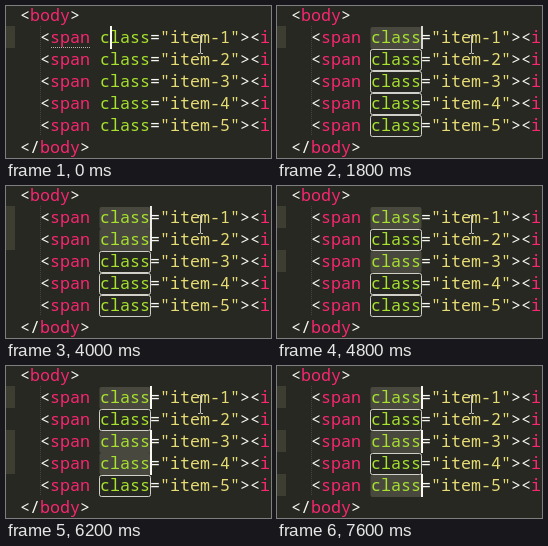
An HTML page for the animation above (7800 ms loop, 265 by 152 pixels).

```html
<!DOCTYPE html>
<html lang="en">
<head>
<meta charset="utf-8">
<title>Multiple selection</title>
<style>
  html, body { margin: 0; width: 100%; height: 100%; overflow: hidden; background: #272822; }
  svg { display: block; width: 100%; height: 100%; }
  text { font: 500 16.667px "Noto Sans Mono", "DejaVu Sans Mono", monospace; white-space: pre; fill: #f8f8f2; }
  .tag { fill: #f92672; }
  .attr { fill: #a6e22e; }
  .str { fill: #e6db74; }
  .gutter { fill: #3e3d32; }
  .sel { fill: #49483e; }
  .box { fill: none; stroke: #d0d0c8; }
  .caret { fill: #f8f8f0; }
  .under { stroke: #b8b8b0; stroke-dasharray: 1 1; }
  .guide { stroke: #43443c; stroke-dasharray: 1 1; }
  .mouse { fill: none; stroke: #c4c4bc; }
</style>
</head>
<body>
<svg id="stage" viewBox="0 0 265 152"></svg>
<script>
const NS = "http://www.w3.org/2000/svg";
const stage = document.getElementById("stage");
const LOOP = 7800, STEP = 200, BLINK = 1200;
const CHAR = 10, LINE = 22, LEFT = 14;
const INDENT = LEFT + 2 * CHAR, WORD = INDENT + 6 * CHAR;

// Each edit: start time, selected rows, blink phase at that moment
const edits = [
  { at: 0, rows: [1], phase: 250, col: 1 },
  { at: 800, rows: [1], phase: 150, col: 5 },
  { at: 2600, rows: [1, 2], phase: 120, col: 5 },
  { at: 4200, rows: [1, 3], phase: 150, col: 5 },
  { at: 5000, rows: [1, 3, 4], phase: 50, col: 5 },
  { at: 6400, rows: [1, 3, 5], phase: 50, col: 5 }
];

function add(name, attrs) {
  const node = document.createElementNS(NS, name);
  for (const key in attrs) node.setAttribute(key, attrs[key]);
  return stage.appendChild(node);
}

function rect(cls, x, y, width, height, rx = 0) {
  return add("rect", { class: cls, x, y, width, height, rx });
}

function write(row, x, parts) {
  const line = add("text", { x, y: 14.5 + row * LINE });
  for (const [str, cls] of parts) {
    const span = document.createElementNS(NS, "tspan");
    span.textContent = str;
    if (cls) span.setAttribute("class", cls);
    line.appendChild(span);
  }
}

function show(node, on) {
  node.setAttribute("visibility", on ? "visible" : "hidden");
}

add("path", { class: "guide", d: `M${INDENT + 0.5} 20V130` });

const rows = [1, 2, 3, 4, 5].map(n => {
  const y = n * LINE - 1;
  return {
    n,
    gutter: rect("gutter", 0, y - 1, 9, LINE),
    sel: rect("sel", WORD - 0.5, y, 5 * CHAR + 1, LINE, 2),
    box: rect("box", WORD - 0.5, y + 0.5, 5 * CHAR + 1, LINE - 1, 2)
  };
});

write(0, LEFT, [["<"], ["body", "tag"], [">"]]);
for (const { n } of rows) {
  write(n, INDENT, [
    ["<"], ["span", "tag"], [" "], ["class", "attr"], ["="],
    [`"item-${n}"`, "str"], ["><"], ["i", "tag"]
  ]);
}
write(6, LEFT, [["</"], ["body", "tag"], [">"]]);

const under = add("path", { class: "under", d: "M45 41.5H84" });
for (const row of rows) row.caret = rect("caret", 0, row.n * LINE - 2, 2, LINE + 1);
add("path", { class: "mouse", d: "M192 29.5H194L194.5 30L195 29.5H197M194.5 30V47M192 47.5H194L194.5 47L195 47.5H197" });

// Hold, fade out, stay off, fade in: a quarter of the period each
function glow(ms) {
  const q = (ms % BLINK) / (BLINK / 4);
  if (q < 1) return 1;
  if (q < 2) return 2 - q;
  return q < 3 ? 0 : q - 3;
}

function draw(time) {
  const t = Math.floor((time % LOOP) / STEP) * STEP;
  const edit = edits.filter(e => e.at <= t).pop();
  const marked = edit.col === 5;
  const alpha = glow(t - edit.at + edit.phase);
  for (const row of rows) {
    const active = edit.rows.includes(row.n);
    show(row.gutter, active);
    show(row.sel, active && marked);
    show(row.box, !active && marked);
    show(row.caret, active);
    row.caret.setAttribute("x", WORD + edit.col * CHAR);
    row.caret.setAttribute("opacity", alpha);
  }
  show(under, !marked);
}

const start = performance.now();
function tick() {
  draw(performance.now() - start);
  requestAnimationFrame(tick);
}
tick();
</script>
</body>
</html>
```
